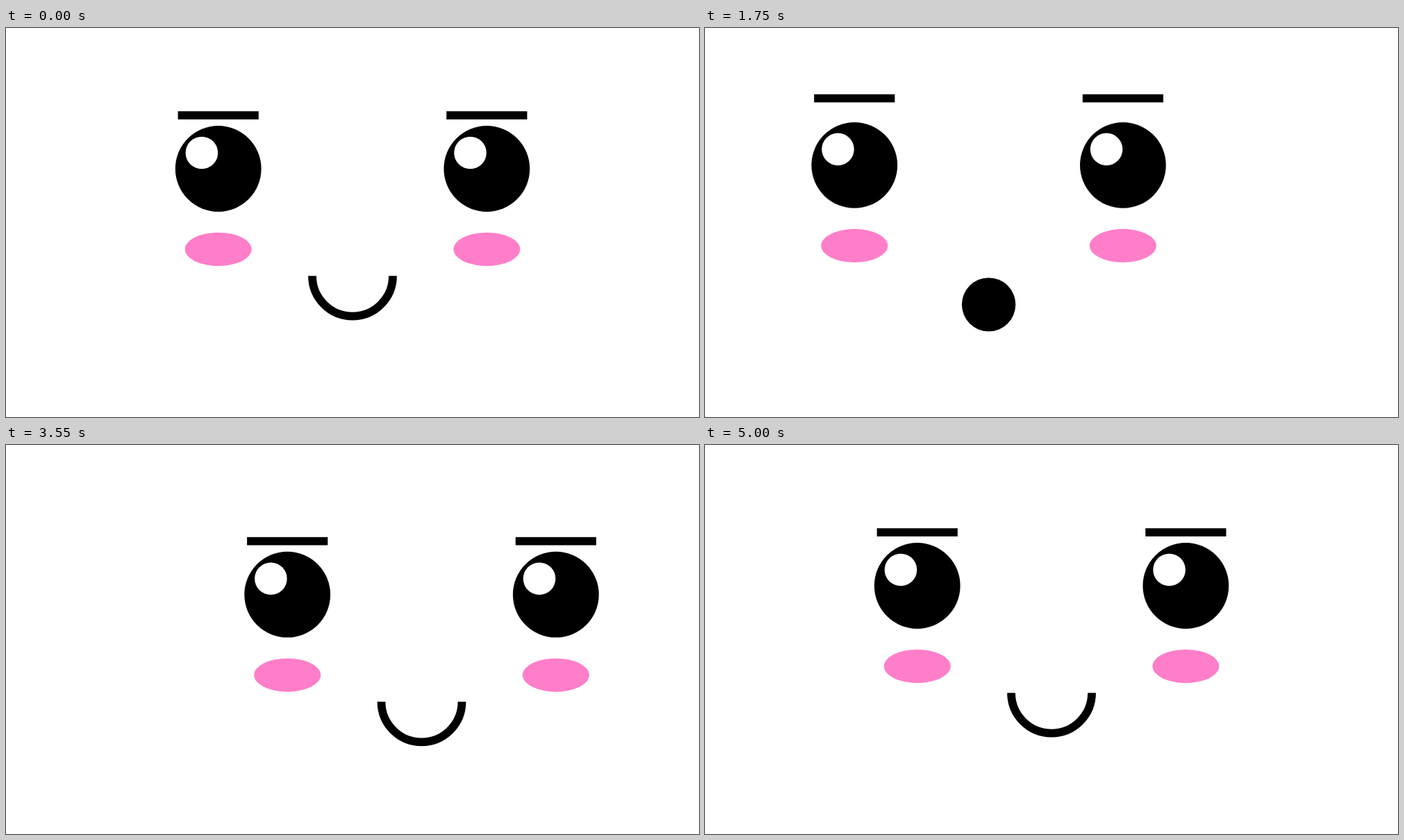
Animation, 998 px wide and 561 px high, one loop 5050 ms. Source, as an HTML page with a canvas:

```html
<!DOCTYPE html>
<html lang="en">
<head>
<meta charset="utf-8">
<title>Cute face</title>
<style>
  html, body { margin: 0; width: 100%; height: 100%; overflow: hidden; background: #fff; }
  canvas { display: block; width: 998px; height: 561px; }
</style>
</head>
<body>
<canvas id="stage" width="998" height="561"></canvas>
<script>
const ctx = document.getElementById('stage').getContext('2d');
const LOOP = 5050, STEP = 50;
const INK = '#000', BLUSH = '#ff7ec9', LID = '#808080';
const CENTER_X = 499.05, EYE_DX = 193.35, EYE_Y = 203, EYE_R = 61.9;

// Cubic Bezier easing, solved by bisection.
function bezier(x1, y1, x2, y2) {
  const at = (a, b, s) => 3 * a * s * (1 - s) ** 2 + 3 * b * s * s * (1 - s) + s ** 3;
  return x => {
    let lo = 0, hi = 1;
    for (let i = 0; i < 30; i++) {
      const mid = (lo + hi) / 2;
      if (at(x1, x2, mid) < x) lo = mid; else hi = mid;
    }
    return at(y1, y2, (lo + hi) / 2);
  };
}

const smooth = x => x * x * (3 - 2 * x);
const glideOut = bezier(0.333, 0.167, 0.667, 1);
const glideHome = bezier(0.28, 0, 0.8, 0.77);

// Keys: [time, value, easing into this key]
const faceX = [[0, 0], [635, -93.3, glideOut], [1665, -93.3], [2918, 120.5, smooth], [5000, 0, glideHome]];
const faceY = [[0, 0], [635, -5.4, glideOut], [1665, -5.4], [2918, 15.4, smooth], [5000, 0, glideHome]];
const browLift = [[0, 0], [625, 0], [1083, 19.4, smooth], [1875, 19.4], [2292, 0, smooth]];
const lidDrop = [[0, 0], [625, 0], [1083, 128, smooth], [1667, 0, smooth]];

function track(keys, t) {
  for (let i = 1; i < keys.length; i++) {
    const [t0, v0] = keys[i - 1], [t1, v1, ease = smooth] = keys[i];
    if (t < t1) return v0 + (v1 - v0) * ease((t - t0) / (t1 - t0));
  }
  return keys[keys.length - 1][1];
}

function oval(x, y, rx, ry, color) {
  ctx.fillStyle = color;
  ctx.beginPath();
  ctx.ellipse(x, y, rx, ry, 0, 0, Math.PI * 2);
  ctx.fill();
}

function drawSide(x, lift, lid) {
  ctx.fillStyle = INK;
  ctx.fillRect(x - 58.1, 120.1 - lift, 116.2, 11.7);

  oval(x, EYE_Y, EYE_R, EYE_R, INK);
  oval(x - 23.8, 180, 23.3, 23.3, '#fff');
  if (lid > 0) {
    ctx.save();
    ctx.beginPath();
    ctx.rect(x - 70, EYE_Y - EYE_R - 2, 140, lid + 2);
    ctx.clip();
    oval(x, EYE_Y, EYE_R, EYE_R, LID);
    ctx.restore();
  }

  oval(x, 319.1, 48, 24.1, BLUSH);
}

function drawMouth(open) {
  if (open) {
    oval(CENTER_X, 404, 38.7, 38.7, INK);
    return;
  }
  ctx.strokeStyle = INK;
  ctx.lineWidth = 11.8;
  ctx.beginPath();
  ctx.arc(CENTER_X, 357.6, 58, 0, Math.PI);
  ctx.stroke();
}

function draw(t) {
  ctx.setTransform(1, 0, 0, 1, 0, 0);
  ctx.fillStyle = '#fff';
  ctx.fillRect(0, 0, 998, 561);
  ctx.translate(track(faceX, t), track(faceY, t));
  const lift = track(browLift, t), lid = track(lidDrop, t);
  drawSide(CENTER_X - EYE_DX, lift, lid);
  drawSide(CENTER_X + EYE_DX, lift, lid);
  drawMouth(t >= 1040 && t < 3040);
}

function tick() {
  const t = performance.now() % LOOP;
  draw(Math.floor(t / STEP) * STEP);
  requestAnimationFrame(tick);
}
tick();
</script>
</body>
</html>
```
